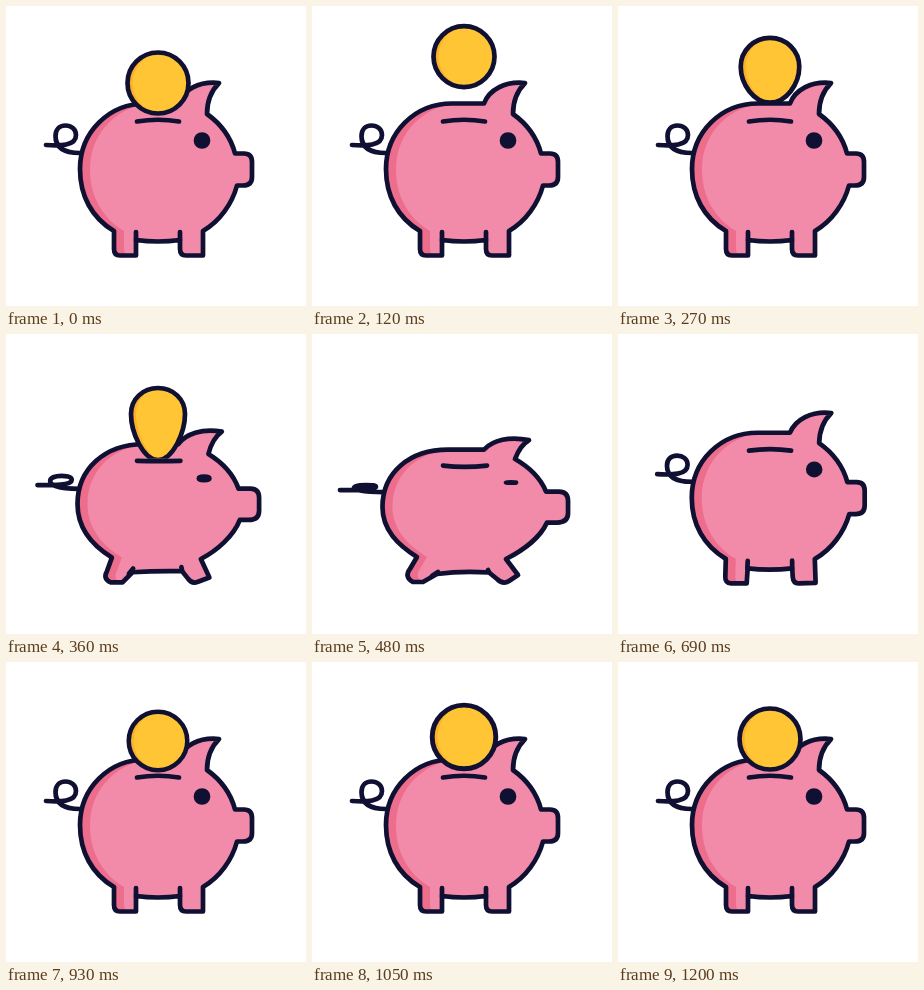
An HTML page with a canvas for the animation above (2.76 s loop, 300 px wide and 300 px high).

```html
<!DOCTYPE html>
<html lang="en">
<head>
<meta charset="utf-8">
<title>Piggy bank</title>
<style>
html, body { margin: 0; height: 100%; overflow: hidden; background: #fff; }
canvas { display: block; }
</style>
</head>
<body>
<canvas id="stage" width="300" height="300"></canvas>
<script>
const ctx = document.getElementById('stage').getContext('2d');
const LOOP = 2760, STEP = 30;
const INK = '#0f1032', PINK = '#f28aa9', ROSE = '#ed6d8d', GOLD = '#ffc535', AMBER = '#fbb02c';

// Each part as [relaxed, squashed]; both poses share one command structure.
const BODY = [
  `M172 97.5 L140 97.5 C103 97.5 74 126 74 163 C74 190 86 212 108 225
   L108 243 Q108 249.5 114 249.5 L130 249.5 L130 234 Q152 237 174 234
   L174 243 Q174 249.5 180 249.5 L197 249.5 L197 225 C214 215 226 198 231 179.5
   L237 179.5 Q246 179.5 246 171 L246 156 Q246 147.5 238 147.5 L229 147.5
   C225 132 215 118 201 108 C201 97 204 86 213 77 C193 75 177 84 172 97.5 Z`,
  `M172 115.5 L136 115.5 C98 115.5 70.5 138 70.5 173 C70.5 196 86 211 105 223
   L98 235 Q92 243 101 248 L111 248 L125 240 Q150 236.5 177 238.5
   L185 245 Q191 251 197 247 L206 241 L194 225 C210 217 228 204 235 188.5
   L245 188.5 Q256 188.5 256 179 L256 167 Q256 157.5 247 157.5 L234 157.5
   C228 143 217 133 203 125 C206 117 210 110 217 106 C197 102 181 106 172 115.5 Z`
];
const CREASES = ['M130 234 L130 226 M174 234 L174 226', 'M120 242 L126 238 M177 238 L176 236'];
const TAIL = [
  'M40 139 C54 140 70 140 70 129 C70 123 65 119.5 59.5 119.5 C53 119.5 49.5 124 49.5 130 C49.5 142 58 147 74 147',
  'M28 156 C45 156 64 156 64 153 C64 151 60 151 54 151 C47 151 42 152 42 154 C42 157 56 158 72 158'
];
const SLOT = ['M131 115.5 Q152 112 173 115.5', 'M131 131.5 Q152 134 175 131.5'];

// Coin outlines around x = 0: width, top, middle and bottom heights.
const oval = (w, top, mid, low, rTop, rLow, up, down) =>
  `M0 ${top} C${rTop} ${top} ${w} ${mid - up} ${w} ${mid} C${w} ${mid + down} ${rLow} ${low} 0 ${low}
   C${-rLow} ${low} ${-w} ${mid + down} ${-w} ${mid} C${-w} ${mid - up} ${-rTop} ${top} 0 ${top} Z`;
const disc = y => oval(30.5, y - 30.5, y, y + 30.5, 16.8, 16.8, 16.8, 16.8);
const EGG = oval(27, 54, 80, 126, 15, 15, 15, 18);
const SUNK = oval(12, 126, 135, 165, 7, 6, 5, 10);

const clamp = x => Math.min(1, Math.max(0, x));
const lerp = (a, b, k) => a + (b - a) * k;

function mix(a, b, k) {
  const ends = b.match(/-?[\d.]+/g);
  let i = 0;
  return a.replace(/-?[\d.]+/g, n => lerp(+n, +ends[i++], k).toFixed(3));
}

// Value at time t through [time, value] keys, eased with a half cosine.
function track(t, keys) {
  const i = keys.findIndex(key => key[0] > t);
  if (i < 0) return keys[keys.length - 1][1];
  if (!i) return keys[0][1];
  const [t0, a] = keys[i - 1], [t1, b] = keys[i];
  return lerp(a, b, (1 - Math.cos(Math.PI * (t - t0) / (t1 - t0))) / 2);
}

const SQUASH = [[290, 0], [435, 1.5], [565, -0.35], [685, 0.07], [735, 0]];
const RISE = [[0, 77], [125, 50.5]];
const POP = [[700, 0], [790, 1.41], [860, 0.87], [1000, 1.05], [1200, 1]];

function outline(path) {
  ctx.strokeStyle = INK;
  ctx.lineWidth = 4.7;
  ctx.stroke(path);
}

// Fills with the shade colour, then the light colour moved right.
function shaded(path, shade, light, shift, plainFrom) {
  ctx.save();
  ctx.clip(path);
  ctx.fillStyle = shade;
  ctx.fill(path);
  ctx.fillStyle = light;
  ctx.fillRect(plainFrom, -50, 300, 400);
  ctx.translate(shift, 0);
  ctx.fill(path);
  ctx.restore();
  outline(path);
}

function drawPig(k) {
  const pose = part => new Path2D(mix(...part, k));
  outline(pose(TAIL));
  shaded(pose(BODY), ROSE, PINK, 10, 130);
  outline(pose(CREASES));
  outline(pose(SLOT));
  const eye = new Path2D();
  eye.ellipse(196 + 3 * k, 134.5 + 14 * k, 6 - Math.max(0, k), Math.max(0.1, 6 * (1 - k)), 0, 0, 7);
  ctx.fillStyle = INK;
  ctx.fill(eye);
  outline(eye);
}

function drawCoin(t, k) {
  if (t >= 450 && t <= 700) return;
  let shape = disc(77);
  ctx.save();
  ctx.translate(152, 0);
  if (t < 450) {
    const fall = clamp((t - 140) / 220) ** 2, sink = clamp((t - 360) / 80);
    shape = mix(mix(disc(track(t, RISE)), EGG, fall), SUNK, sink);
    ctx.beginPath();
    ctx.rect(-60, 0, 120, 113 + 16.5 * k);
    ctx.clip();
  } else {
    const s = track(t, POP);
    ctx.translate(0, 125);
    ctx.scale(s, s);
    ctx.translate(0, -125);
  }
  shaded(new Path2D(shape), AMBER, GOLD, 5, 5);
  ctx.restore();
}

function frame(now) {
  const t = Math.floor(now % LOOP / STEP) * STEP;
  const k = track(t, SQUASH);
  ctx.fillStyle = '#fff';
  ctx.fillRect(0, 0, 300, 300);
  ctx.lineCap = ctx.lineJoin = 'round';
  drawPig(k);
  drawCoin(t, k);
}

const start = performance.now();
function loop() {
  frame(performance.now() - start);
  requestAnimationFrame(loop);
}
loop();
</script>
</body>
</html>
```
